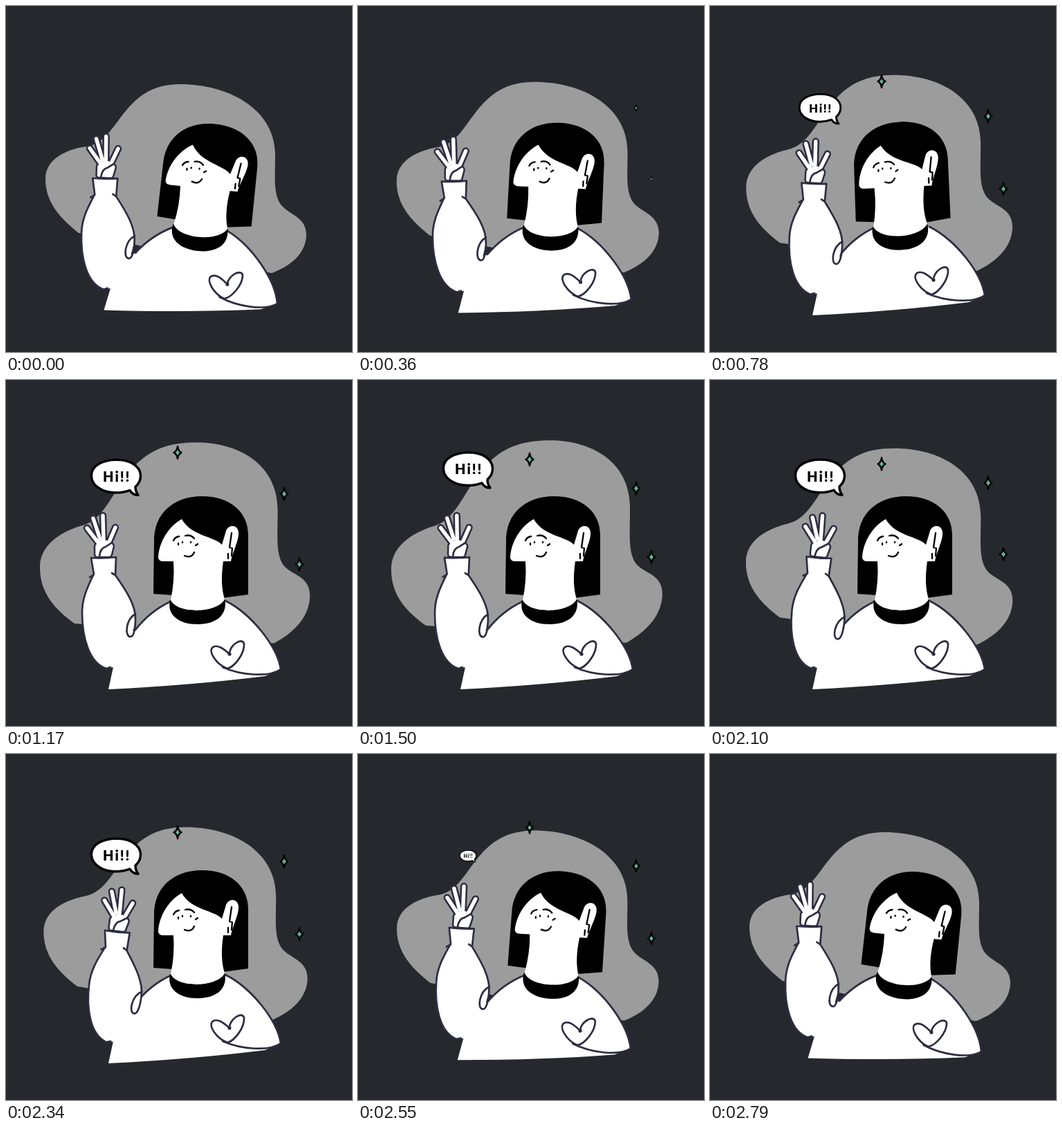
These frames come from a looping animation (500 px wide and 500 px high, 2820 ms). An HTML page:

```html
<!DOCTYPE html>
<html lang="en">
<head>
<meta charset="utf-8">
<title>Waving hello</title>
<style>
  html, body { margin: 0; height: 100%; overflow: hidden; background: #25292e; }
  svg { display: block; width: 100%; height: 100%; }
  path { stroke-linecap: round; stroke-linejoin: round; }
  .line { fill: none; stroke: #2c2d42; stroke-width: 2.7; }
  .skin { fill: #fff; }
  .ink { fill: none; stroke: #000; stroke-width: 2.3; }
  .edge { stroke: #2c2d42; stroke-width: 10.5; }
  .finger { stroke: #fff; stroke-width: 5.4; }
  text { font: 900 20px Lato, "Open Sans", sans-serif; letter-spacing: 2px; }
</style>
</head>
<body>
<svg viewBox="0 0 500 500">
  <defs>
    <path id="star" d="M0-9Q1-2 5.5 0Q1 2 0 9Q-1 2-5.5 0Q-1-2 0-9Z" fill="#5fb597" stroke="#000" stroke-width="2.4"/>
    <path id="hand" d="M134 236L117 214M136 230L126 200M141 230L140 196M149 234L158 213M132 252V240Q142 228 152 240L149 252Z"/>
  </defs>

  <path id="blob" fill="#9c9c9c" d="M57 250C57 217 95 206 116 203C165 197 165 113 252 113C320 113 389 148 389 215C389 250 386 272 398 288C410 302 434 305 434 331C433 362 405 378 384 386L105 328C80 308 57 285 57 250"/>

  <g id="body">
    <path class="skin" d="M238 320Q208 334 187 361L150 380L155 415L148 447Q270 441 374 428L397 418C392 385 355 342 317 319Z"/>
    <path class="line" d="M238 320Q208 334 187 361M317 319C355 338 392 385 397 418C380 430 340 427 313 415"/>
    <path class="line" d="M323 396C314 388 306 382 299 386C291 392 304 411 320 417C331 414 345 395 344 381C341 371 322 384 323 396"/>
    <circle cx="323" cy="396" r="2.6" fill="#2c2d42"/>
    <g id="arm">
      <use class="edge" href="#hand"/>
      <use class="finger" href="#hand" fill="#fff"/>
      <path class="line" d="M135 255Q136 243 144 241L153 235"/>
      <path class="skin" d="M123 257L159 256L158 282C172 302 188 325 187 346L172 412L145 417C118 408 109 365 110 335C112 310 120 295 126 282Z"/>
      <path class="line" d="M121 285L127 281L123 257Q141 258 159 256L158 282L153 279M126 282C118 299 110 315 110 336C110 372 120 409 145 417L151 415M158 282C172 302 188 325 187 346C187 358 185 371 180 371C171 371 173 346 187 338"/>
    </g>
  </g>

  <g id="head">
    <path d="M213 309L214 232C214 193 242 168 283 168C324 168 350 191 350 224L350 310L313 315L242 311Z"/>
    <path d="M237 318C232 340 250 353 277 353C304 353 321 339 316 316Z"/>
    <path class="skin" d="M254 201C236 211 221 233 220 257Q221 262 227 262H242Q244 290 238 318C247 338 304 338 316 317Q309 295 314 262H325C327 250 337 231 336 220C335 209 322 208 318 218L312 238C302 226 268 226 254 201Z"/>
    <path class="ink" d="M326 221L323 242L327 243L326 254M321 251V258M242 232Q244 227 250 226M259 225Q267 223 272 229M249 236V238M274 239L277 237M258 254Q268 258 272 249M255 234V235M267 234V235"/>
  </g>

  <use class="star" href="#star"/>
  <use class="star" href="#star"/>
  <use class="star" href="#star"/>

  <g id="bubble">
    <path d="M20 20C7 25-12 25-23 18C-39 9-40-9-25-18C-11-26 13-26 25-18C39-9 38 6 28 15Q28 22 32 27Q24 27 20 20Z" fill="#fff" stroke="#000" stroke-width="3.5"/>
    <text x="-19" y="7.5">Hi!!</text>
  </g>
</svg>
<script>
const LOOP = 2820, BOB = 1680;
const $ = id => document.getElementById(id);
const stars = [...document.querySelectorAll('.star')];

// Eased rise from 0 to 1 between two times
function ramp(t, from, to) {
  const p = Math.min(1, Math.max(0, (t - from) / (to - from)));
  return (1 - Math.cos(Math.PI * p)) / 2;
}

// Floating height, lowest on screen at the given time
const bob = (t, mid, size, low) => mid + size * Math.cos(2 * Math.PI * (t - low) / BOB);

const move = (el, value) => el.setAttribute('transform', value);
const turn = (id, angle, x, y) => move($(id), `rotate(${angle} ${x} ${y})`);
const place = (el, x, y, size) => move(el, `translate(${x} ${y}) scale(${size})`);

function draw(t) {
  const swell = 1.13 * (ramp(t, 0, 1500) - ramp(t, 1500, LOOP));
  move($('blob'), `matrix(${1 + 0.035 * swell} ${-0.13 * swell} 0 ${1 + 0.12 * swell} ${-10 * swell} ${-2 * swell})`);

  const back = ramp(t, 2340, 2700);
  const lean = 1 - ramp(t, 0, 700) + back;
  const nod = ramp(t, 240, 780) - ramp(t, 780, 1170);
  const wave = 5.5 * ramp(t, 360, 780) - 3.3 * ramp(t, 780, 1170) + 7.2 * ramp(t, 1260, 2440) - 9.4 * back - 2.2;
  turn('body', 4.5 * lean, 241, 360);
  turn('head', 5.7 * lean - 2.6 * nod, 267, 361);
  turn('arm', wave, 150, 417);

  const fade = 1 - 0.92 * ramp(t, 2500, 2800);
  place(stars[0], 248, bob(t, 114, -10, 1060), ramp(t, 400, 720) * fade);
  place(stars[1], 402, bob(t, 156, 9, 1100), ramp(t, 180, 540) * fade);
  place(stars[2], 424, bob(t, 258, 10, 1020), ramp(t, 200, 600) * fade);
  place($('bubble'), 159, bob(t, 137.5, -10, 1640), ramp(t, 560, 860) - ramp(t, 2380, 2660));
}

const start = performance.now();
function tick() {
  draw((performance.now() - start) % LOOP);
  requestAnimationFrame(tick);
}
tick();
</script>
</body>
</html>
```
